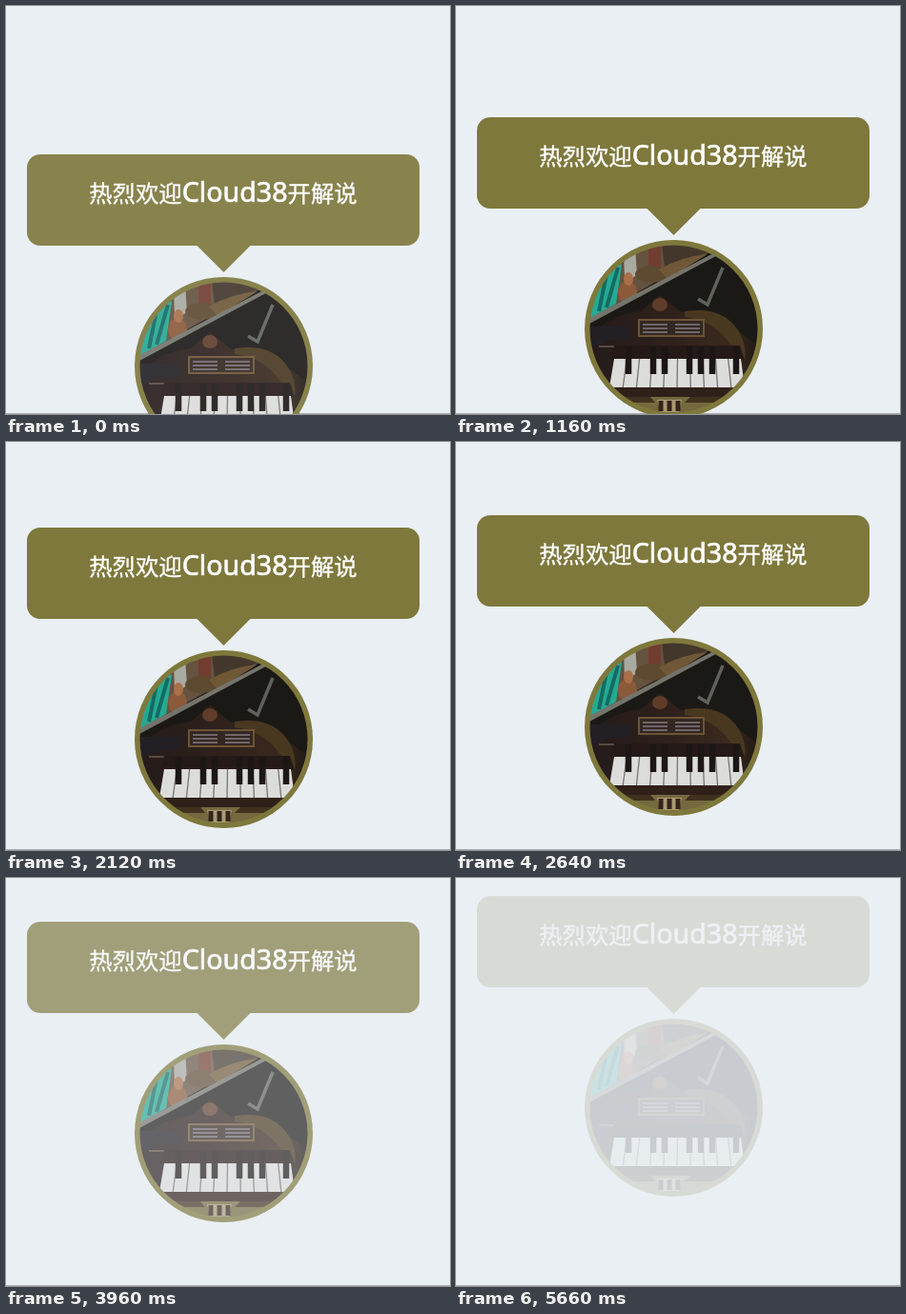
An HTML page for the animation above (5740 ms loop, 466 px wide and 429 px high).

```html
<!DOCTYPE html>
<html lang="zh-CN">
<head>
<meta charset="utf-8">
<title>欢迎</title>
<style>
  html, body { margin: 0; width: 100%; height: 100%; overflow: hidden; background: #eaeff4; }
  svg { display: block; width: 466px; height: 429px; }
  text { font: 24.4px "Noto Sans CJK SC", "Noto Sans CJK", sans-serif; fill: #fff; stroke: #fff; stroke-width: .35px; }
  .name { font: 28.6px "Noto Sans", "Open Sans", sans-serif; stroke-width: .7px; }
</style>
</head>
<body>
<svg viewBox="0 0 466 429">
  <defs>
    <clipPath id="round"><circle cx="228.5" cy="222.5" r="88"/></clipPath>
    <filter id="soft"><feGaussianBlur stdDeviation=".7"/></filter>
    <linearGradient id="body" x1="0" y1="0" x2="1" y2="0">
      <stop offset="0" stop-color="#241b1b"/>
      <stop offset=".5" stop-color="#30211b"/>
      <stop offset=".85" stop-color="#3a2a1d"/>
      <stop offset="1" stop-color="#1f1914"/>
    </linearGradient>
  </defs>
  <rect y="428" width="466" height="1" fill="#a9adb0"/>
  <g id="card">
    <rect x="22" width="412" height="96" rx="14" fill="#7e783c"/>
    <path d="M200 95.5H257L228.5 124Z" fill="#7e783c"/>
    <text x="87.2" y="49.8">热烈欢迎<tspan class="name">Cloud38</tspan>开解说</text>
    <circle cx="228.5" cy="222.5" r="93.5" fill="#7e783c"/>
    <g clip-path="url(#round)">
      <g filter="url(#soft)">
        <rect x="140" y="134" width="177" height="177" fill="#181613"/>
        <!-- room behind the lid -->
        <path d="M140 134H280L140 212Z" fill="#65523f"/>
        <path d="M140 150L174 155L168 196L140 212Z" fill="#25a993"/>
        <path d="M159 160L150 204M170 158L158 200" stroke="#136b63" stroke-width="4"/>
        <path d="M176 142L188 136L190 166L177 174Z" fill="#a9aaa2"/>
        <path d="M202 134H215V158H202Z" fill="#713d30"/>
        <path d="M216 134H278L220 166Z" fill="#43372c"/>
        <ellipse cx="205" cy="165" rx="17" ry="9" fill="#5d4a30"/>
        <path d="M213 160Q238 146 264 144L222 170Z" fill="#705837"/>
        <ellipse cx="180" cy="184" rx="10" ry="12" fill="#8a5a3a"/>
        <ellipse cx="181" cy="170" rx="5" ry="7" fill="#a9704a"/>
        <!-- lid and prop -->
        <path d="M140 211L276 140L284 141L200 188L140 219Z" fill="#74746b"/>
        <path d="M140 217L282 141L317 150V240H140Z" fill="#1b1916"/>
        <path d="M254 191L264 197L280 158" fill="none" stroke="#5f625a" stroke-width="3.5"/>
        <!-- case -->
        <path d="M140 230Q160 208 194 204L214 187L236 205Q277 202 300 228L317 240V311H140Z" fill="url(#body)"/>
        <path d="M240 204Q280 198 296 224Q306 240 303 256L286 236Q270 214 240 210Z" fill="#493820"/>
        <ellipse cx="214" cy="197" rx="8" ry="7" fill="#5f3d2a"/>
        <rect x="192" y="213" width="68" height="17" fill="#34271f" stroke="#6b5537" stroke-width="2"/>
        <path d="M196 218H222M196 222H222M196 226H222M230 218H256M230 222H256M230 226H256" stroke="#827a84" stroke-width="1.6"/>
        <path d="M140 220H182V234H158L150 240H140Z" fill="#222025"/>
        <path d="M150 241H194" stroke="#594a41" stroke-width="2"/>
        <!-- keyboard -->
        <path d="M166 240H298L303 255H163Z" fill="#261a18"/>
        <path d="M166 254H299L303 284H161Z" fill="#dcdddb"/>
        <g id="keys"></g>
        <path d="M140 285H317V294H140Z" fill="#30201a"/>
        <path d="M140 294H317V311H140Z" fill="#74693f"/>
        <path d="M150 294H204L209 300H160ZM246 294H306L290 300H240Z" fill="#40311f"/>
        <path d="M211 297H237L234 310H214Z" fill="#aa9a70"/>
        <path d="M215 298V309M224 298V309M233 298V309" stroke="#33251c" stroke-width="5"/>
      </g>
    </g>
  </g>
</svg>
<script>
  const LOOP = 5740, STEP = 73.75;
  const tops = [[0, 156], [580, 136], [1160, 117], [1760, 100], [2340, 84], [2940, 69],
    [3520, 55], [4120, 43], [4700, 32], [5300, 23], [5660, 19]];
  const fades = [[0, .9], [400, 1], [2900, 1], [3960, .67], [4780, .41], [5660, .16]];
  const card = document.getElementById('card');

  function drawKeys() {
    let gaps = '', sharps = '';
    for (let i = 1; i < 10; i++) gaps += `M${166 + i * 13.3} 254L${161 + i * 14.2} 284`;
    for (const x of [181, 207, 219, 245, 257, 269, 294]) sharps += `M${x} 241V270`;
    document.getElementById('keys').innerHTML =
      `<path d="${gaps}" stroke="#77736e" stroke-width="1.3"/>` +
      `<path d="${sharps}" stroke="#1c1714" stroke-width="6.5"/>`;
  }

  // Linear interpolation through [time, value] points
  function at(points, t) {
    const i = points.findIndex(p => p[0] > t);
    if (i < 0) return points[points.length - 1][1];
    const [t0, v0] = points[i - 1], [t1, v1] = points[i];
    return v0 + (v1 - v0) * (t - t0) / (t1 - t0);
  }

  const start = performance.now();
  function draw() {
    const t = (performance.now() - start) % LOOP;
    const n = Math.min(77, Math.floor((t + 23.75) / STEP));
    const held = Math.max(0, n * STEP - 13.75);
    card.setAttribute('transform', `translate(0 ${Math.round(at(tops, held) + .4)})`);
    card.setAttribute('opacity', at(fades, held).toFixed(3));
    requestAnimationFrame(draw);
  }

  drawKeys();
  draw();
</script>
</body>
</html>
```
